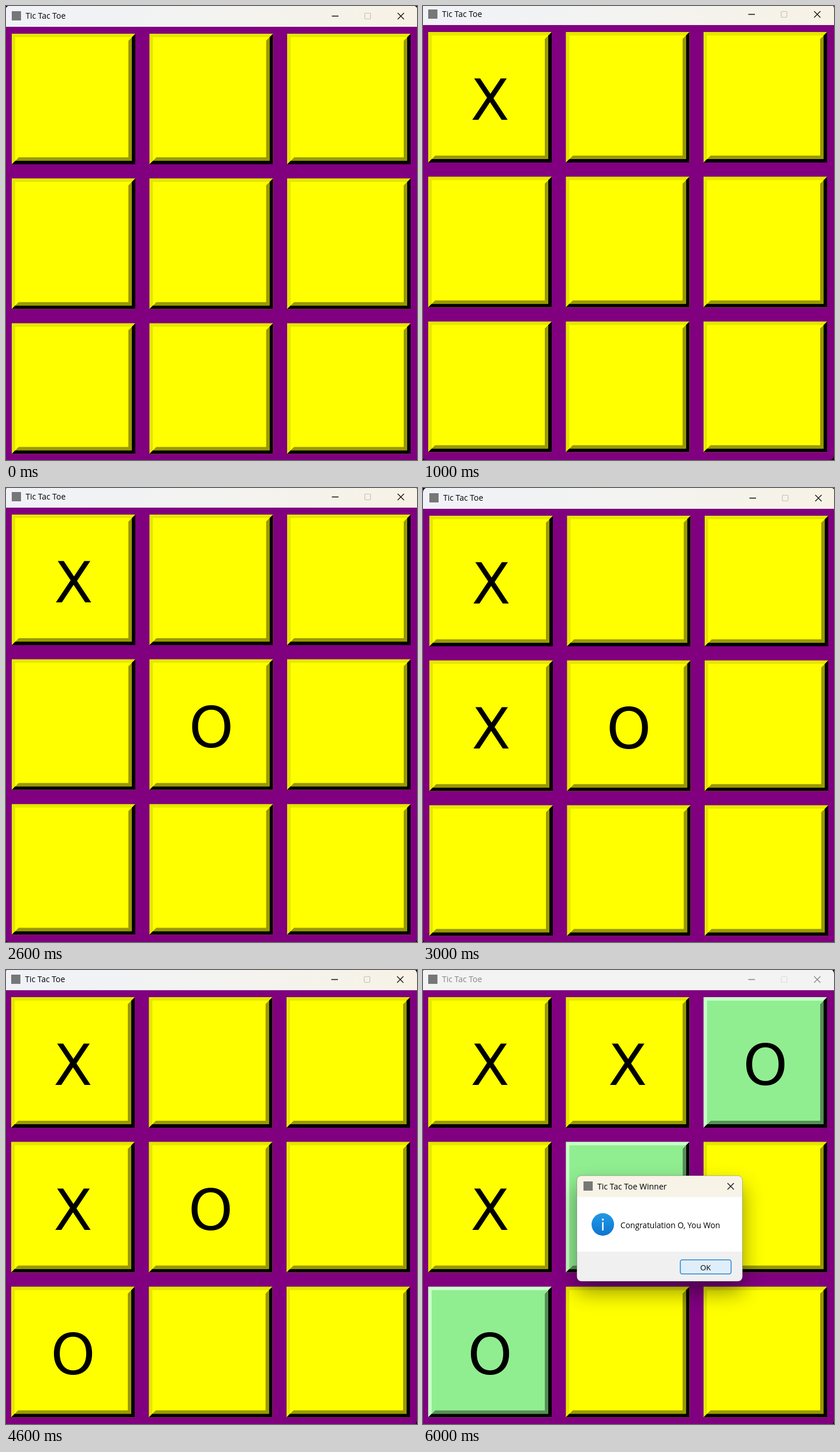
Recreate the animation shown at these times as an HTML page. Size 712 by 786 pixels, loop 7000 ms.

```html
<!DOCTYPE html>
<html lang="en">
<head>
<meta charset="utf-8">
<title>Tic Tac Toe</title>
<style>
  html, body { margin: 0; width: 100%; height: 100%; overflow: hidden; background: #000; }
  svg { display: block; width: 712px; height: 786px; }
  .ui { font-family: "Open Sans", "Noto Sans", sans-serif; font-size: 14px; }
  .mark { font-family: "DejaVu Sans", sans-serif; font-size: 98px; text-anchor: middle; }
</style>
</head>
<body>
<svg viewBox="0 0 712 786" xmlns="http://www.w3.org/2000/svg">
  <defs>
    <linearGradient id="bar">
      <stop offset="0" stop-color="#f0f2f8"/>
      <stop offset=".5" stop-color="#f3f3f1"/>
      <stop offset="1" stop-color="#f7f2e5"/>
    </linearGradient>
    <linearGradient id="info" x2="0" y2="1">
      <stop offset="0" stop-color="#1f9ae6"/>
      <stop offset="1" stop-color="#0f74d0"/>
    </linearGradient>
    <clipPath id="frame"><rect x="-1" y="-.5" width="714" height="789.5" rx="8"/></clipPath>
    <clipPath id="box"><rect x="266.5" y="356" width="287" height="183" rx="8"/></clipPath>
    <filter id="blur" x="-50%" y="-50%" width="200%" height="200%">
      <feGaussianBlur stdDeviation="18"/>
    </filter>
  </defs>

  <g id="win">
    <g clip-path="url(#frame)">
      <rect x="-1" y="-1" width="714" height="791" fill="#800080"/>
      <rect id="title" x="-1" y="-1" width="714" height="37"/>
      <rect x="10" y="9" width="16" height="16" fill="#777"/>
      <text id="name" class="ui" x="34" y="22">Tic Tac Toe</text>
      <path id="ctrl" d="M564.5 17.5h11.5M678.5 12l11 11M689.5 12l-11 11" fill="none" stroke-width="1.3"/>
      <rect id="max" x="621.5" y="12.5" width="10" height="10" rx="1.5" fill="none" stroke-width="1.2"/>
      <g id="board"></g>
    </g>
  </g>

  <g id="dialog">
    <rect x="266.5" y="374" width="287" height="183" rx="8" opacity=".42" filter="url(#blur)"/>
    <g clip-path="url(#box)">
      <rect x="266" y="356" width="288" height="37" fill="#f7f3e7"/>
      <rect x="266" y="393" width="288" height="95" fill="#fff"/>
      <rect x="266" y="487.5" width="288" height="52" fill="#f0f0f0"/>
    </g>
    <rect x="266.5" y="356" width="287" height="183" rx="8" fill="none" stroke="#000" stroke-opacity=".25"/>
    <rect x="278" y="366" width="16" height="16" fill="#777"/>
    <text class="ui" x="302" y="379.5">Tic Tac Toe Winner</text>
    <path d="M527.5 369l11 11M538.5 369l-11 11" stroke="#111" stroke-width="1.3"/>
    <circle cx="311.5" cy="440.5" r="19.5" fill="url(#info)"/>
    <circle cx="311.5" cy="432" r="1.8" fill="#fff"/>
    <path d="M311.5 436.5v14.5" stroke="#fff" stroke-width="2.6"/>
    <text class="ui" x="342" y="446.5" style="font-size:13.75px">Congratulation O, You Won</text>
    <rect x="445.7" y="501.7" width="88" height="24.6" rx="3.5" fill="#e0eef9" stroke="#2287d8" stroke-width="1.5"/>
    <text class="ui" x="489.5" y="519.5" text-anchor="middle" style="font-size:13.25px">OK</text>
  </g>
</svg>
<script>
const STEP = 1000;
const W = 214, H = 226, B = 6;
const YELLOW = { face: '#ffff00', light: '#e6e600', dark: '#999900' };
const GREEN = { face: '#90ee90', light: '#c9ffc9', dark: '#568f56' };

// moves in playing order: [cell, mark]
const moves = [[0, 'X'], [4, 'O'], [3, 'X'], [6, 'O'], [1, 'X'], [2, 'O']];
const winners = [2, 4, 6];
// window offset at each step
const shifts = [[0, 0], [-1, -3], [0, -2], [1, 0], [-1, -1], [0, 1], [-1, -1]];

const $ = id => document.getElementById(id);

function add(parent, tag, attrs) {
  const el = document.createElementNS('http://www.w3.org/2000/svg', tag);
  for (const k in attrs) el.setAttribute(k, attrs[k]);
  return parent.appendChild(el);
}

function makeCell(i) {
  const x = 10 + (i % 3) * 238.5, y = 48 + Math.floor(i / 3) * 250.6;
  const g = add($('board'), 'g', { transform: `translate(${x} ${y})` });
  const w = W - B, h = H - B, b = 2 * B;
  const light = add(g, 'path', { d: `M0 0H${W}V${H}H0z` });
  add(g, 'path', { d: `M${W} 0V${H}H0l${B} ${-B}H${w}V${B}z` });
  const dark = add(g, 'path', { d: `M${w} ${B}V${h}H${B}l${B} ${-B}H${w - B}V${b}z` });
  const face = add(g, 'path', { d: `M${B} ${B}H${w}l${-B} ${B}V${h - B}H${b}l${-B} ${B}z` });
  const mark = add(g, 'text', { class: 'mark', x: W / 2, y: 152.3 });
  return { light, dark, face, mark };
}

const cells = Array.from({ length: 9 }, (_, i) => makeCell(i));

function draw(step) {
  const over = step === moves.length;
  $('win').setAttribute('transform', `translate(${shifts[step]})`);
  cells.forEach((c, i) => {
    const colors = over && winners.includes(i) ? GREEN : YELLOW;
    for (const part in colors) c[part].setAttribute('fill', colors[part]);
    const move = moves.slice(0, step).find(m => m[0] === i);
    c.mark.textContent = move ? move[1] : '';
  });
  $('title').setAttribute('fill', over ? '#f3f3f3' : 'url(#bar)');
  $('name').setAttribute('fill', over ? '#858585' : '#000');
  $('ctrl').setAttribute('stroke', over ? '#858585' : '#111');
  $('max').setAttribute('stroke', over ? '#dedede' : '#c3c0b9');
  $('dialog').style.display = over ? '' : 'none';
}

let shown = -1;
function tick() {
  const step = Math.floor(performance.now() / STEP) % shifts.length;
  if (step !== shown) draw(shown = step);
  requestAnimationFrame(tick);
}
tick();
</script>
</body>
</html>
```
